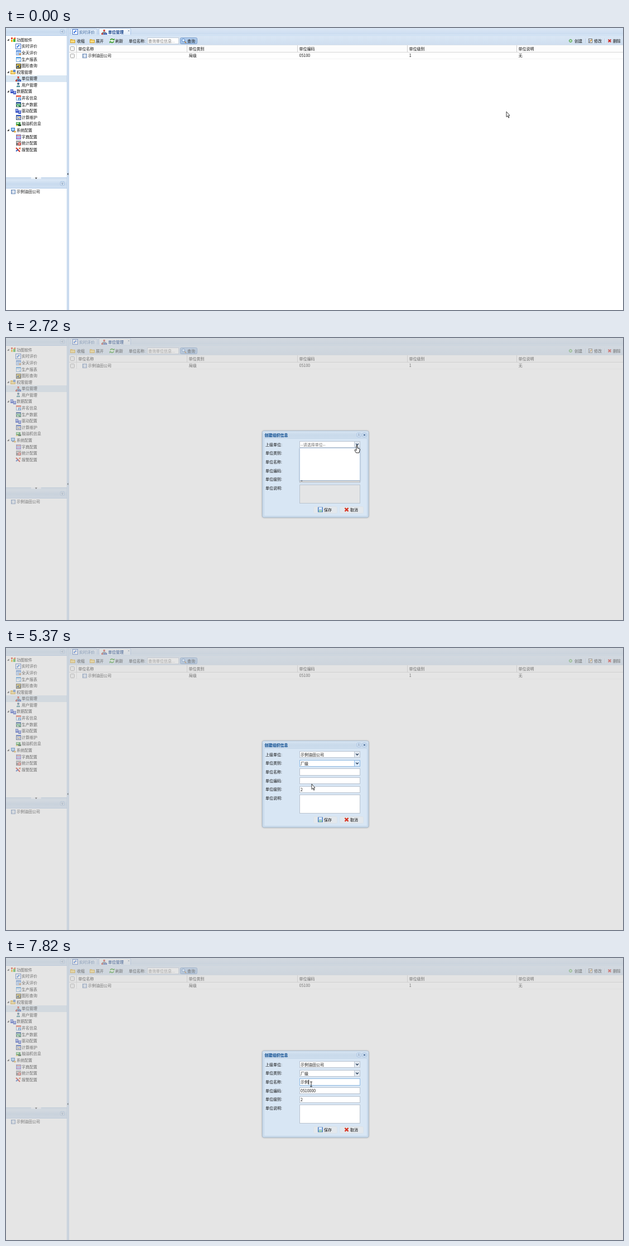
Animation of 1106 by 506 pixels, one loop 8 s. Source, as an HTML page with a canvas:

```html
<!DOCTYPE html>
<html lang="zh-CN">
<head>
<meta charset="utf-8">
<title>单位管理</title>
<style>
html, body { margin: 0; width: 100%; height: 100%; overflow: hidden; background: #fff; }
canvas { display: block; width: 1106px; height: 506px; }
</style>
</head>
<body>
<canvas id="stage" width="1106" height="506"></canvas>
<script>
const g = document.getElementById('stage').getContext('2d');
const LOOP = 8000, W = 1106, H = 506;
const FONT = '"Noto Sans CJK SC", "Noto Sans CJK", "Noto Sans", sans-serif';
const COMPANY = '示例油田公司';
const INK = '#111', LINE = '#b0cae9';

// ---------- helpers ----------
function box(c, x, y, w, h) { g.fillStyle = c; g.fillRect(x, y, w, h); }
function frame(c, x, y, w, h) { g.strokeStyle = c; g.lineWidth = 1; g.strokeRect(x + .5, y + .5, w - 1, h - 1); }
function grad(y, h, ...cs) {
  const p = g.createLinearGradient(0, y, 0, y + h);
  cs.forEach((c, i) => p.addColorStop(i / (cs.length - 1), c));
  return p;
}
function text(s, x, mid, c = INK, bold) {
  g.font = (bold ? 'bold ' : '') + '7px ' + FONT;
  g.fillStyle = c;
  g.fillText(s, x, mid + 2.6);
}
function poly(c, pts, edge, lw = .8) {
  g.beginPath();
  pts.forEach(p => g.lineTo(p[0], p[1]));
  g.closePath();
  if (c) { g.fillStyle = c; g.fill(); }
  if (edge) { g.strokeStyle = edge; g.lineWidth = lw; g.lineJoin = 'round'; g.stroke(); }
}
function path(c, lw, ...pts) {
  g.beginPath();
  pts.forEach(p => g.lineTo(p[0], p[1]));
  g.strokeStyle = c; g.lineWidth = lw; g.stroke();
}
function disc(c, x, y, r) { g.beginPath(); g.arc(x, y, r, 0, 7); g.fillStyle = c; g.fill(); }
function ring(c, x, y, r, lw = 1, a = 0, b = 7) { g.beginPath(); g.arc(x, y, r, a, b); g.strokeStyle = c; g.lineWidth = lw; g.stroke(); }
function round(c, x, y, w, h, r, edge) {
  g.beginPath(); g.roundRect(x, y, w, h, r);
  g.fillStyle = c; g.fill();
  if (edge) { g.strokeStyle = edge; g.lineWidth = 1; g.stroke(); }
}
function cross(c, r, lw) { path(c, lw, [-r, -r], [r, r]); path(c, lw, [r, -r], [-r, r]); }
function at(x, y, draw) { g.save(); g.translate(x, y); draw(); g.restore(); }

// ---------- icons, each centred on 0,0 and about 9px wide ----------
function sheet(top, edge = '#5b8fd0', fill = '#fff') {
  box(fill, -4, -4, 9, 9); frame(edge, -4, -4, 9, 9); box(top, -4, -4, 9, 2.5);
}
function servers() {
  box('#3b55c4', -5, -4, 5, 7); box('#3b55c4', 0, -1, 5, 6);
  box('#dbe6ff', -4, -3, 3, 1); box('#dbe6ff', -4, -1, 3, 1);
  box('#dbe6ff', 1, 0, 3, 1); box('#dbe6ff', 1, 2, 3, 1);
}
const icons = {
  bars() { box('#e8402c', -4, -4, 3, 3); box('#f2b41c', -4, 0, 3, 4); box('#f2c832', 0, -3, 2, 2); box('#42b33c', 0, -1, 4, 5); box('#e8402c', 2, -4, 2, 3); },
  live() { box('#fff', -5, -5, 10, 10); frame('#4673c8', -5, -5, 10, 10); poly('#2b6ee0', [[-3, 1], [1, -3], [3, -1], [0, 0], [-1, 3]]); },
  day() { sheet('#4b86d8', '#6e9bd8', '#e3efff'); box('#5f93dc', -2, 0, 5, 1); box('#5f93dc', -2, 2, 4, 1); disc('#ee9a3c', 3, 3, 1.8); },
  report() { sheet('#4c9be0', '#73a9dc'); box('#b8d6f1', -2, 0, 5, 1); disc('#9fc3e6', 3, 3, 1.6); },
  find() { box('#f6d64c', -4, -4, 8, 8); frame('#333', -4, -4, 9, 9); poly('#2d62b8', [[-3, 3], [-1, -2], [1, 3]]); ring('#333', 2, 1, 2, 1.2); },
  folder() { box('#e9bd45', -5, -3, 4, 2); box('#f6da7e', -5, -2, 9, 6); frame('#d2a22e', -5, -2, 9, 6); },
  rights() { icons.folder(); box('#3e6cc0', 0, -4, 4, 4); box('#7ba6e6', 1, -3, 2, 2); },
  org() { path('#444', 1, [0, -1], [0, 1], [-3, 1], [-3, 3]); path('#444', 1, [0, 1], [3, 1], [3, 3]); box('#d8402e', -1.5, -4, 3, 3); box('#c04a40', -5, 2, 3, 3); box('#35549f', -1.5, 2, 3, 3); box('#3a5cb8', 2, 2, 3, 3); },
  user() { disc('#3c6a8c', 0, -2, 2); poly('#3f8c9a', [[-3.5, 4], [-2, 1], [2, 1], [3.5, 4]]); box('#e9d7b8', -.5, 0, 1, 3); },
  servers,
  well() { sheet('#e0503c', '#7da6dc'); box('#2a78d0', 0, 0, 1.5, 5); box('#2a78d0', 0, 0, 4, 1.2); box('#2a78d0', 3, 2, 1.5, 3); },
  data() { sheet('#274e92', '#2d5f5b', '#d5efdc'); path('#239048', 1.3, [-3, 3], [-1, 0], [1, 2], [4, -1]); box('#2a8a4c', 1, 2, 3, 2); },
  calc() { sheet('#2e55b8', '#2a4387', '#fff6cf'); box('#2e55b8', -2, 0, 2, 1); box('#e08b2a', 1, 0, 3, 1); box('#2e55b8', -2, 2, 5, 1); },
  pump() { box('#3c9a48', -4, -3, 8, 6); box('#c7efc4', -3, -2, 4, 2); box('#2d4f2f', 0, 1, 5, 3); box('#f0c63e', -4, 2, 3, 2); },
  system() { box('#3a78c8', -4, -4, 7, 6); box('#a6d3f5', -3, -3, 5, 4); box('#666', -2, 2, 3, 1.5); disc('#e0a13a', 3, 3, 1.8); },
  dict() {
    frame('#7f8fd0', -4, -4, 9, 9);
    ['#d9483b', '#3d6fd0', '#b04ac0'].forEach((c, i) => { for (let j = 0; j < 3; j++) box(c, -3 + j * 2.6, -3 + i * 2.6, 1.8, 1.8); });
  },
  stats() { sheet('#9c9c9c', '#888', '#ddd'); ring('#d83a32', 2, 2, 2, 1.4); box('#6a6a6a', -3, 0, 2, 4); },
  alarm() { path('#d73428', 2.2, [-4, -3], [0, 1], [3, 4]); path('#2d56b0', 2, [-4, 3], [0, 0]); poly('#e86a2c', [[0, -2], [4, -4], [4, 0]]); },
  unit() { box('#fff', -4, -4, 8, 7); frame('#6b8cb8', -4, -4, 8, 8); box('#3f69a8', -3, -2, 2, 1); box('#3f69a8', -3, 1, 2, 1); box('#8ba8cf', 0, -2, 3, 1); box('#8ba8cf', 0, 1, 3, 1); },
  refresh() { box('#e6f5e2', -4, -4, 8, 8); ring('#37962f', 0, 0, 3.2, 1.7, .3, 2.8); ring('#37962f', 0, 0, 3.2, 1.7, 3.5, 5.9); poly('#37962f', [[1, -1], [4.5, -4.5], [4.5, -1]]); poly('#37962f', [[-1, 1], [-4.5, 4.5], [-4.5, 1]]); },
  lens() { path('#a4733c', 1.5, [1, 1], [4, 4]); disc('#d9ebff', -1, -1, 2.7); ring('#5c8fce', -1, -1, 2.7); },
  plus() { box('#5aa858', -1.5, -3, 3, 6); box('#5aa858', -3, -1.5, 6, 3); box('#e4f6de', -.5, -2, 1, 4); box('#e4f6de', -2, -.5, 4, 1); },
  edit() { box('#fff', -3, -3.5, 6, 8); frame('#6d6d6d', -3, -4, 7, 8); path('#dc9a2c', 1.6, [-1, 2], [3, -2]); box('#3f66a8', -1, -2, 1, 5); },
  del() { cross('#cf2a22', 2.4, 2); },
  save() { box('#3f78c6', -4.5, -4.5, 9, 9); box('#e6f1fc', -3, -4, 6, 3); box('#9fd0a8', -3, 1, 6, 3); box('#fff', -3.5, -.5, 7, 1.2); },
  cancel() { cross('#d8321f', 3, 2.4); }
};
const icon = (name, x, y) => at(x, y, icons[name]);

// ---------- page ----------
const tree = [
  ['bars', '功图软件', 1], ['live', '实时评价'], ['day', '全天评价'], ['report', '生产报表'], ['find', '图形查询'],
  ['rights', '权限管理', 1], ['org', '单位管理'], ['user', '用户管理'],
  ['servers', '数据配置', 1], ['well', '井名信息'], ['data', '生产数据'], ['servers', '驱动配置'], ['calc', '计算维护'], ['pump', '抽油机信息'],
  ['system', '系统配置', 1], ['dict', '字典配置'], ['stats', '统计配置'], ['alarm', '报警配置']
];

function toolButton(x, y, dir) {
  round('#e7f0fa', x - 3.5, y - 3.5, 7, 7, 1.5, '#a3bfe0');
  for (const d of [-1, 1]) {
    if (dir === 'left') path('#3c6494', .8, [x + d + 1, y - 1.8], [x + d - .8, y], [x + d + 1, y + 1.8]);
    else {
      const s = dir === 'down' ? 1 : -1;
      path('#3c6494', .8, [x - 1.8, y + d * 1.1 - s * .8], [x, y + d * 1.1 + s * .8], [x + 1.8, y + d * 1.1 - s * .8]);
    }
  }
}

function sidebar() {
  const head = (y, h) => { box(grad(y, h, '#dbe8f6', '#c8daee', '#d3e2f3'), 0, y, 109, h); box(LINE, 0, y + h - 1, 109, 1); };
  head(0, 14); toolButton(101, 6.5, 'left');
  box('#d9e7f3', 0, 85, 109, 12);
  tree.forEach(([ic, label, top], i) => {
    const y = 21.2 + i * 11.58;
    if (top) poly('#333', [[5.6, y - 2], [5.6, y + 1.6], [2, y + 1.6]]);
    icon(ic, top ? 13 : 22, Math.round(y));
    text(label, top ? 19 : 28, y);
  });
  box('#d3e1f1', 0, 268, 109, 4); box(LINE, 0, 268, 109, .7);
  box('#eef4fb', 45, 268, 18, 3); poly('#333', [[52, 268.5], [56, 268.5], [54, 271]]);
  head(272, 16); toolButton(101, 279, 'down');
  icon('unit', 13, 294); text(COMPANY, 19, 293.5);
  box('#d3e1f1', 109, 0, 4, H); box(LINE, 109, 0, .7, H); box(LINE, 112, 0, .8, H);
  poly('#333', [[111.6, 260], [111.6, 264], [109.6, 262]]);
}

function tabs() {
  box(grad(0, 12, '#dbe7f5', '#cbdcf0'), 113, 0, W - 113, 13);
  round(grad(1, 11, '#e4eefa', '#cfe0f3'), 115.5, 1.5, 48, 12, [2, 2, 0, 0], '#afc9e8');
  round(grad(0, 13, '#ffffff', '#deebf8'), 166.5, .5, 57, 14, [2, 2, 0, 0], '#a3c0e6');
  box('#deebf8', 113, 12, W - 113, 2); box(LINE, 113, 13.5, W - 113, .7);
  icon('live', 124, 7); text('实时评价', 131, 7, '#41699b');
  icon('org', 176, 7); text('单位管理', 183, 7, '#15428b', true);
  at(220, 5, () => cross('#7e93ad', 1.4, .8));
}

function toolbar(button) {
  box(grad(14, 16, '#dae7f5', '#cfdeef'), 113, 14, W - 113, 16);
  icon('folder', 120, 23); text('收缩', 127, 23);
  icon('folder', 155, 23); text('展开', 161, 23);
  icon('refresh', 190, 23); text('刷新', 196, 23);
  text('单位名称:', 220, 23);
  box('#fff', 253, 17, 57, 12); frame('#c3cedb', 253, 17, 57, 12);
  text('查询单位信息...', 255, 23, '#777');
  round(grad(17, 11, '#b3cdec', '#9fc0e6'), 312.5, 17.5, 30, 11, 2, '#7b9fce');
  icon('lens', 319, 23); text('查询', 325, 23);
  if (button) round(button > 1 ? grad(17, 11, '#a5c0e2', '#b7d0ee') : '#dfecfb', 1006.5, 17.5, 30, 11, 2, button > 1 ? '#6f8fbd' : '#8fb3df');
  icon('plus', 1012, 23); text('创建', 1019, 23);
  icon('edit', 1047, 23); text('修改', 1054, 23);
  icon('del', 1082, 23); text('删除', 1088, 23);
  for (const x of [1039, 1073]) { box('#b6cce6', x, 19, 1, 8); box('#f2f7fc', x + 1, 19, 1, 8); }
}

function checkbox(y) { round('#f6f6f6', 115.5, y + .5, 7, 7, 1, '#a3a3a3'); }

function table(hover) {
  box('#fcfcfc', 113, 30, W - 113, 13);
  if (hover) box(grad(30, 13, '#f4f4f4', '#e6e6e6'), 915, 30, W - 915, 13);
  box('#c9d6e5', 113, 30, W - 113, .7); box('#d6d6d6', 113, 43, W - 113, 1);
  const xs = [126, 324, 522, 719, 915];
  const heads = ['单位名称', '单位类别', '单位编码', '单位级别', '单位说明'];
  const row = ['', '局级', '05100', '1', '无'];
  xs.forEach((x, i) => {
    box('#cfcfcf', x, 31, 1, 12);
    text(heads[i], x + 3.5, 37); text(row[i], x + 3.8, 49.5);
  });
  box('#e0e0e0', 126, 44, 1, 11); box('#f3f3f3', 113, 55, W - 113, 1);
  checkbox(33); checkbox(46);
  icon('unit', 141, 50); text(COMPANY, 147, 49.5);
}

// ---------- dialog ----------
function field(y, value, { h = 12, white, focus, hint, combo } = {}) {
  const edge = focus ? '#8db8e2' : '#b9c3cf';
  box(white ? '#fff' : '#e4e5e6', 526, y, 109, h);
  frame(edge, 526, y, 109, h);
  text(value, 528, y + 6, hint ? '#707070' : INK);
  if (combo) {
    round(focus ? '#dceafa' : '#e2e8ef', 624.5, y + .5, 10, h - 1, 0, edge);
    path('#1d3553', 1.3, [627.2, y + 4.6], [629.5, y + 7], [631.8, y + 4.6]);
  }
}
function button(x, ic, label) {
  round('#e3e8ed', x + .5, 302.5, 42, 12, 2, '#dce2e8');
  icon(ic, x + 12.5, 308); text(label, x + 19, 308.3);
}
function caret(x, y) { box('#000', x, y, .9, 8.5); }
function list(y, h) {
  g.save(); g.shadowColor = 'rgba(0,0,0,.25)'; g.shadowBlur = 2; g.shadowOffsetY = 1;
  box('#fff', 526, y, 109, h); g.restore();
  frame('#b4cae3', 526, y, 109, h);
}

function dialog(t, cur) {
  const filled = t >= 5370, named = t >= 6200;
  g.save(); g.shadowColor = 'rgba(0,0,0,.4)'; g.shadowBlur = 3;
  round('#cddded', 459.5, 166.8, 190.5, 155.2, 3); g.restore();
  round('#cddded', 459.5, 166.8, 190.5, 155.2, 3, '#a9bccf');
  round(grad(167, 14, '#d6e4f2', '#c9daeb', '#cddded'), 460, 167.3, 189.5, 15, [2, 2, 0, 0]);
  box('#d8e6f4', 462, 181, 186, 138.5); frame('#c5d7ea', 462, 180, 186, 140);
  text('创建组织信息', 463.5, 174, '#04468c', true);
  toolButton(632.5, 174, 'up');
  round('#e7f0fa', 639, 170.5, 7, 7, 1.5, '#a3bfe0');
  at(642.5, 174, () => cross('#3c6494', 1.7, 1.1));

  ['上级单位:', '单位类别:', '单位名称:', '单位编码:', '单位级别:', '单位说明:']
    .forEach((s, i) => text(s, 465, 191.2 + i * 15.65));
  const picked = t >= 3780;
  field(185, picked ? COMPANY : '--请选择单位--', { combo: 1, hint: !picked, white: t >= 2600, focus: t >= 3660 && t < 4310 });
  field(201, filled ? '厂级' : '--全部--', { combo: 1, hint: !filled, white: t >= 4310, focus: t >= 4310 && !named });
  field(216, '', { h: 13, white: filled, focus: named });
  field(232, t >= 5750 ? '0510000' : '', { white: filled });
  field(248, filled ? '2' : '1', { white: filled });
  field(263, '', { h: 34, white: filled });
  button(551, 'save', '保存');
  button(598, 'cancel', '取消');

  if (t >= 4310 && t < 4860) caret(528, 202.5);
  if (t >= 2720 && t < 3660) {
    list(197, 59);
    if (t >= 3390) { box('#ececec', 527, 198, 107, 11); frame('#9d9d9d', 526, 198, 109, 12); }
    if (t >= 2840) { icon('unit', 540, 204); text(COMPANY, 546, 203.7); }
  }
  if (t >= 4430 && t < 5370) {
    list(213, 102);
    const hot = t < 4980 ? 0 : Math.min(2, Math.floor((cur[2] - 213) / 12.8));
    box('#d5e3f2', 527, 213.5 + hot * 12.8, 107, 12.5);
    ['集团', '局级', '厂级', '矿级', '队级', '工区', '集气站', '其他']
      .forEach((s, i) => text(s, 528.5, 219.7 + i * 12.8));
  }
  if (named) typing(t);
}

function typing(t) {
  const keys = [7130, 7250, 7370, 7520, 7670].filter(k => t >= k).length;
  const done = t >= 7820;
  const word = done ? COMPANY.slice(0, 2) : 'shili'.slice(0, keys);
  text(word, 528, 222.5);
  const w = word ? g.measureText(word).width : 0;
  if (keys || t < 6850) caret(528 + w + .3, 218.5);
  if (!keys || done) return;
  box('#333', 528, 226.5, w, .6);
  const right = keys < 4 ? 739 : 753;
  box('#fff', 538, 231, right - 538, 31); frame('#b9c4d2', 538, 231, right - 538, 31);
  text(word, 543, 239, '#333');
  box('#e2e7ed', 542, 246, right - 546, 1);
  const picks = keys < 4 ? ['是', '时', '事', '市', '使'] : ['示例', '势力', '实力', '视力', '事例'];
  picks.forEach((p, i) => text(i + 1 + '. ' + p, 543 + i * 36, 254, i ? '#333' : '#1c62c4'));
}

// ---------- pointer: time, x, y, shape ----------
const moves = [
  [0, 897, 150], [580, 904, 146], [700, 936, 126], [850, 958, 82], [970, 985, 34], [1120, 1000, 30],
  [1240, 1010, 26, 'hand'], [1360, 1012, 24, 'hand'], [1640, 1012, 24], [1790, 1003, 32], [1910, 974, 51],
  [2060, 815, 125], [2180, 663, 200], [2330, 642, 196], [2450, 629, 193, 'hand'], [3120, 615, 196], [3240, 597, 198],
  [3390, 588, 202], [3510, 583, 204, 'busy'], [3660, 583, 204], [3900, 616, 209], [4050, 623, 206], [4170, 629, 206, 'hand'],
  [4860, 618, 214], [4980, 597, 226], [5100, 567, 238], [5220, 548, 244], [5490, 548, 240], [5610, 548, 237],
  [5750, 547, 233, 'beam'], [5900, 547, 227, 'beam'], [6050, 547, 224, 'beam'], [6200, 547, 226.5, 'beam']
];
const arrow = [[0, 0], [0, 9.6], [2.2, 7.6], [3.7, 11.2], [5, 10.6], [3.5, 7.2], [6, 7]];
const hand = [[-1, 0], [.8, 0], [1, 4.6], [4.6, 5.6], [5.5, 7], [4.6, 10], [4, 13], [-1.4, 13], [-4, 8.6], [-3.4, 7.2], [-1, 8.8]];

function pointer([, x, y, kind]) {
  at(x, y, () => {
    if (kind === 'hand') return poly('#fff', hand, '#111', .9);
    if (kind === 'beam') {
      path('#111', .9, [0, -4], [0, 4]);
      for (const e of [-4.3, 4.3]) path('#111', .9, [-2, e], [2, e]);
      return;
    }
    poly('#fff', arrow, '#111');
    if (kind === 'busy') { disc('#2189cf', 8, 1.3, 4.6); disc('#fff', 8, 1.3, 1.8); }
  });
}

// ---------- loop ----------
function render(t) {
  const cur = moves.filter(m => m[0] <= t).pop();
  const open = t >= 1640;
  box('#fff', 0, 0, W, H);
  sidebar();
  tabs();
  toolbar(open || t < 1240 ? 0 : t < 1520 ? 1 : 2);
  table(!open && t >= 970);
  if (open) {
    box('rgba(204,204,204,.5)', 0, 0, W, H);
    dialog(t, cur);
  }
  pointer(cur);
}
const start = performance.now();
function tick() {
  render((performance.now() - start) % LOOP);
  requestAnimationFrame(tick);
}
tick();
</script>
</body>
</html>
```
